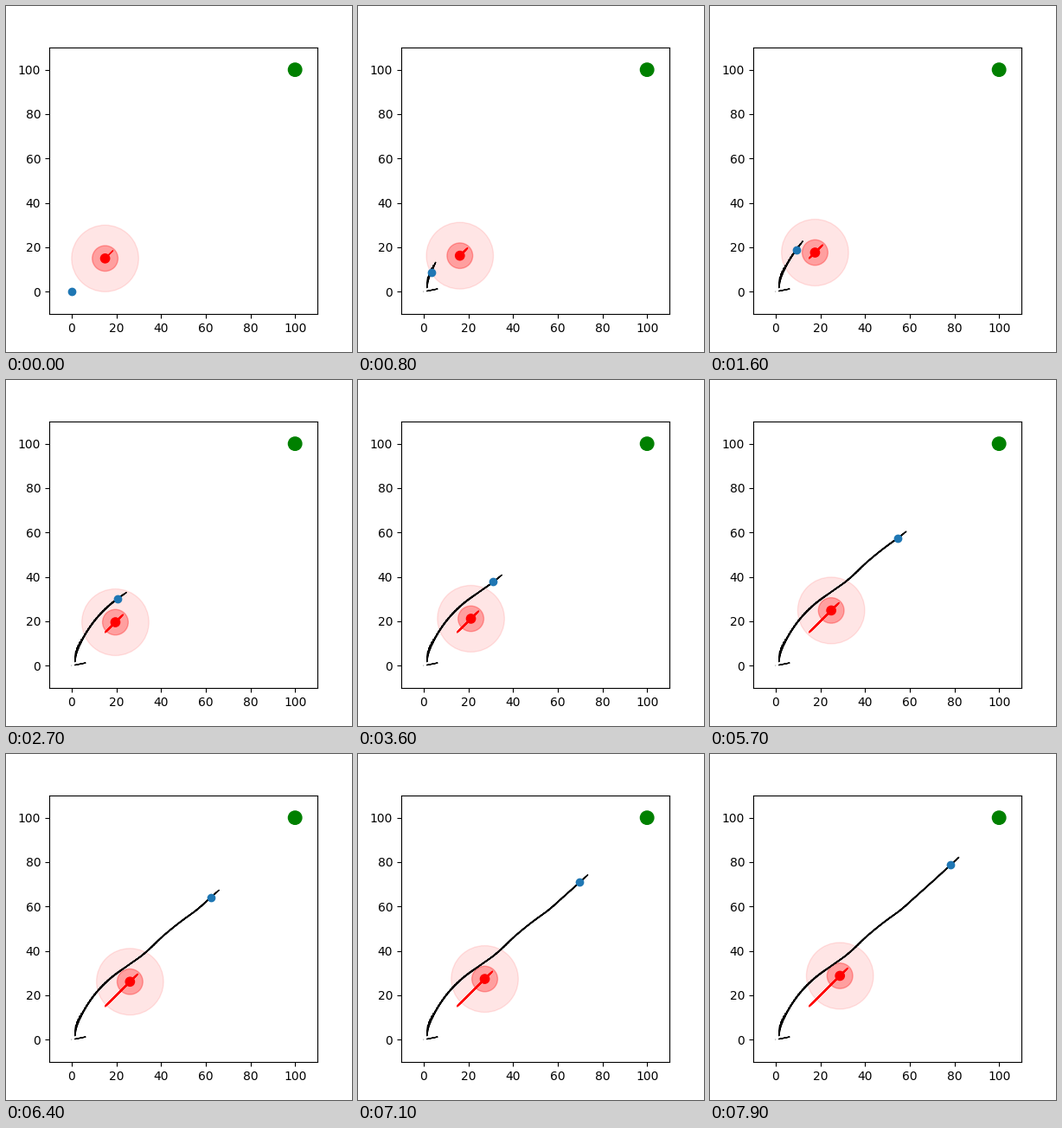
A matplotlib script that plays this animation: 400x400 px, repeating every 8 s.

```python
import numpy as np
import matplotlib.pyplot as plt
from matplotlib.animation import FuncAnimation
from matplotlib.patches import Circle

FRAMES = 80
ARROW = 5
ROBOT_SPEED = 1.456
OBSTACLE_SPEED = 0.25

# Robot steering: (step, heading in degrees), linear in between
TURNS = [(2, 11.5), (3, 86), (8, 67), (27, 37), (33, 35), (41, 44),
         (55, 36), (61, 41.5), (79, 43)]


def walk(start, degrees, speed):
    """Positions and unit headings; the first two frames stand still."""
    angles = np.radians(degrees)
    heading = np.column_stack([np.cos(angles), np.sin(angles)])
    moves = heading * speed
    moves[:2] = 0
    return np.array(start) + np.cumsum(moves, axis=0), heading


steps = np.arange(FRAMES)
robot, robot_dir = walk((0, 0), np.interp(steps, *zip(*TURNS)), ROBOT_SPEED)
robot_dir[:2] = 0  # at rest the arrow shrinks to a dot
obstacle, obstacle_dir = walk((15, 15), np.full(FRAMES, 45), OBSTACLE_SPEED)

fig, ax = plt.subplots(figsize=(4, 4), dpi=100)
ax.set_xlim(-10, 110)
ax.set_ylim(-10, 110)

ax.add_patch(Circle((100, 100), 3, color="green"))
rings = [ax.add_patch(Circle((15, 15), radius, color="red", alpha=alpha))
         for radius, alpha in ((15, 0.1), (5.75, 0.3), (2, 1))]
dot, = ax.plot([0], [0], "o", color="C0")


def arrows(positions, headings, color):
    return [ax.arrow(*pos, *(ARROW * way), color=color)
            for pos, way in zip(positions, headings)]


trails = [arrows(robot, robot_dir, "black"), arrows(obstacle, obstacle_dir, "red")]
ax.set_xlim(-10, 110)
ax.set_ylim(-10, 110)


def update(n):
    for trail in trails:
        for i, arrow in enumerate(trail):
            arrow.set_visible(i <= n)
    for ring in rings:
        ring.center = obstacle[n]
    dot.set_data([robot[n, 0]], [robot[n, 1]])
    return []


anim = FuncAnimation(fig, update, frames=FRAMES, interval=100, repeat=True,
                     repeat_delay=0, blit=False)
plt.show()
```
